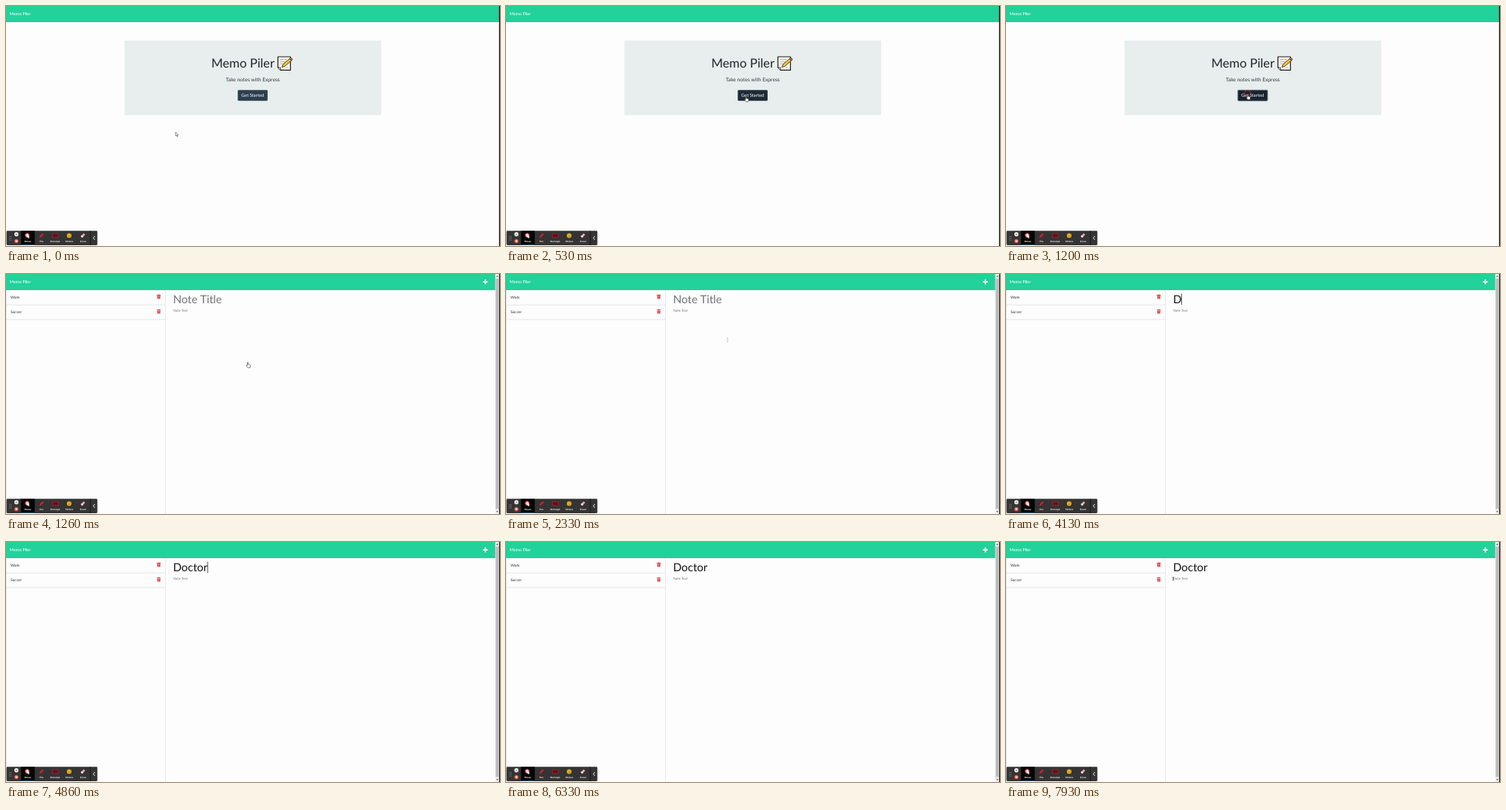
Write an HTML page that moves like this. It is 640 by 312 pixels and loops after 8 s.

```html
<!DOCTYPE html>
<html lang="en">
<head>
<meta charset="utf-8">
<title>Memo Piler</title>
<style>
  html, body { margin: 0; width: 100%; height: 100%; overflow: hidden; background: #fdfdfd; }
  svg { display: block; width: 100%; height: 100%; }
  text { font-family: Lato, sans-serif; text-rendering: geometricPrecision; white-space: pre; }
  .mid { text-anchor: middle; }
  .tool { font: bold 2.9px Lato, sans-serif; fill: #fff; text-anchor: middle; }
</style>
</head>
<body>
<svg viewBox="0 0 640 312">
  <defs>
    <g id="trash" fill="#e0474c">
      <path d="M0 .5h1.5l.4-.5h1.3l.4.5h1.5v.8H0z"/>
      <path d="M.3 1.6h4.5l-.3 3.6q0 .5-.5.5H1.1q-.5 0-.5-.5z"/>
      <path d="M1.7 2.4v2.5M2.55 2.4v2.5M3.4 2.4v2.5" stroke="#f6b9ba" stroke-width=".3"/>
    </g>
  </defs>

  <rect width="640" height="312" fill="#fdfdfd"/>
  <rect width="640" height="21" fill="#23d19a"/>
  <text x="4.8" y="12.4" font-size="5.4" font-weight="500" fill="#fff">Memo Piler</text>

  <g id="home">
    <rect x="153.5" y="44.8" width="332.5" height="97" fill="#e8eeed"/>
    <text x="266" y="80.2" font-size="16.2" fill="#212529">Memo Piler</text>
    <g stroke-linejoin="round">
      <path d="M352.3 66h16.2v17.4h-12.8l-3.4-3.4z" fill="#fbf8ee" stroke="#1d1d1d" stroke-width="1.2"/>
      <path d="M352.3 80h3.4v3.4" fill="#ddd" stroke="#1d1d1d" stroke-width=".8"/>
      <path d="M355 69.5h9M355 72.3h7M355 75h4.5M362 80h4" stroke="#a9a9a4" stroke-width=".8"/>
      <path d="M357.6 79.5l1.2-3.6 8.6-7.4 2.3 2.5-8.6 7.4z" fill="#f7c43c" stroke="#1d1d1d" stroke-width=".8"/>
      <path d="M367.4 68.5l1.5-1.2q1.7.4 2.2 2.5l-1.4 1.2z" fill="#e56b62" stroke="#1d1d1d" stroke-width=".7"/>
    </g>
    <text class="mid" x="319.7" y="98.2" font-size="6.7" fill="#333a40">Take notes with Express</text>
    <rect id="button" x="300.3" y="109.3" width="38.6" height="14" rx="1.3"/>
    <text class="mid" x="319.6" y="118.3" font-size="5.85" fill="#fff">Get Started</text>
    <path d="M639.4 0V312" stroke="#111" stroke-width="1.2"/>
  </g>

  <g id="notes">
    <path d="M617.9 10.2h6.4M621.1 7v6.4" stroke="#fff" stroke-width="1.6"/>
    <path d="M.4 21V312M206.6 21V312M0 40.2H206.5M0 59.2H206.5" stroke="#dfe1e2" stroke-width=".8"/>
    <g font-size="4.85" fill="#24282c">
      <text x="6" y="31.9">Work</text>
      <text x="6" y="51.1">Soccer</text>
    </g>
    <use href="#trash" x="195.4" y="26.6"/>
    <use href="#trash" x="195.4" y="45.8"/>
    <text id="title" x="216.4" y="38.2" font-size="14.5"></text>
    <text x="216.5" y="49.4" font-size="4.45" fill="#777">Note Text</text>
    <path id="caret" stroke="#111" stroke-width=".7"/>
    <rect x="633.8" width="5.2" height="312" fill="#f1f1f1"/>
    <rect x="634.4" y="6" width="3.8" height="299.5" fill="#bcbcbc"/>
    <path d="M635 3.7l1.4-1.7 1.4 1.7zM635 308.2l1.4 1.7 1.4-1.7z" fill="#505050"/>
    <path d="M639.4 0V312" stroke="#222" stroke-width="1.2"/>
  </g>

  <g id="toolbar">
    <rect x=".6" y="292.3" width="117.8" height="18.7" rx="1.4" fill="#343434"/>
    <path d="M4.7 299v6M6.5 299v6" stroke="#999" stroke-width=".8" stroke-dasharray=".8 .9"/>
    <circle cx="13.5" cy="296.8" r="2.7" fill="#f2f2f2"/>
    <path d="M12.6 295.9l1.8 1.8m0-1.8l-1.8 1.8" stroke="#333" stroke-width=".6"/>
    <circle cx="13.5" cy="305.6" r="2.7" fill="#ec5a50"/>
    <rect x="12.5" y="304.6" width="2" height="2" fill="#fff"/>
    <rect x="19.4" y="292.3" width="17.8" height="18.7" fill="#050505"/>
    <path d="M19.4 310.5h17.8" stroke="#2f6f96" stroke-width=".8"/>
    <circle cx="27.5" cy="298" r="2.6" fill="#f5c9c9" stroke="#cf2b36" stroke-width=".9"/>
    <path d="M27.7 297.2v4.4l1-.9.8 1.5.7-.4-.7-1.5h1.4z" fill="#fff"/>
    <path d="M43.2 301.3l.8-2.3 3.6-3.4 1.4 1.4-3.5 3.6z" fill="#dc1f2e"/>
    <rect x="60.2" y="296" width="7.6" height="5" fill="#4c1a1e" stroke="#b5172a" stroke-width=".9"/>
    <circle cx="81.8" cy="298.6" r="3" fill="#f3b51f"/>
    <path d="M80.2 299q1.6 2 3.2 0" fill="none" stroke="#5c3a05" stroke-width=".5"/>
    <path d="M80.7 297.3v.7M82.9 297.3v.7" stroke="#5c3a05" stroke-width=".6"/>
    <path d="M96.8 299.6l3.8-4 2 1.7-3.8 4z" fill="#f0a3ad"/>
    <path d="M96.8 299.6l1.4-1.5 2 1.7-1.4 1.5z" fill="#f7e4e6"/>
    <path d="M109.2 292.3V311" stroke="#111" stroke-width=".8"/>
    <path d="M115 299.2l-1.8 2.3 1.8 2.3" fill="none" stroke="#fff" stroke-width="1"/>
    <text class="tool" x="28.2" y="306.8">Mouse</text>
    <text class="tool" x="46" y="306.8">Pen</text>
    <text class="tool" x="63.8" y="306.8">Rectangle</text>
    <text class="tool" x="82" y="306.8">Stickers</text>
    <text class="tool" x="100" y="306.8">Eraser</text>
  </g>

  <circle id="ring" cx="313" cy="113.8" r="4.2" fill="none" stroke="#d8343f" stroke-width=".9"/>
  <g id="pointer" stroke-linejoin="round">
    <path id="arrow" d="M0 0v5l1.1-1 .8 1.8.8-.4-.8-1.7h1.5z" fill="#fff" stroke="#222" stroke-width=".5"/>
    <path id="hand" d="M-.6.6q.6-.9 1.2 0v2.5l2 .4q.9.3.8 1.3l-.5 2.6H-.1l-1.9-2.7q.1-.9 1.4 0z" fill="#fff" stroke="#222" stroke-width=".55"/>
    <path id="beam" d="M-.9 0h1.8M0 0v5M-.9 5h1.8" fill="none" stroke="#888" stroke-width=".4"/>
  </g>
</svg>
<script>
  const LOOP = 8000, OPEN = 1260;
  const STEP = 67; // pointer is sampled at this interval
  const $ = id => document.getElementById(id);
  const show = (id, on) => $(id).setAttribute('display', on ? 'inline' : 'none');
  const set = (id, attrs) => {
    for (const k in attrs) $(id).setAttribute(k, attrs[k]);
  };
  const within = (t, a, b) => t >= a && t < b;

  // Pointer stops: time, x, y
  const path = [
    [0, 219.8, 164], [600, 311, 117], [800, 311, 117], [860, 313.2, 114.4],
    [1460, 313.2, 114.4], [1660, 302, 102], [2060, 302, 102], [2860, 246, 31]
  ];
  const typed = [[4130, 'D'], [4330, 'Doc'], [4660, 'Doct'], [4800, 'Docto'], [4860, 'Doctor']];
  const titleCaret = [[3060, 3600], [4130, 5330]];
  const textCaret = [[5730, 6330], [6860, 7330], [7930, LOOP]];

  function pointerAt(t) {
    const i = path.findLastIndex(p => p[0] <= t);
    const a = path[i], b = path[i + 1];
    if (!b) return a.slice(1);
    const u = (t - a[0]) / (b[0] - a[0]);
    const k = u * u * (3 - 2 * u);
    return [a[1] + (b[1] - a[1]) * k, a[2] + (b[2] - a[2]) * k];
  }

  function drawPointer(t) {
    const s = t < 60 ? 0 : Math.min(60 + Math.floor((t - 60) / STEP + 1) * STEP, t + STEP);
    const [x, y] = pointerAt(t < OPEN ? s : t);
    const over = x > 300 && y < 123;
    set('pointer', { transform: `translate(${x} ${y})` });
    show('arrow', t < OPEN && !over);
    show('hand', t < 1460 && over);
    show('beam', within(t, 1460, 3060));
    show('ring', within(t, 1060, OPEN));
    const pressed = t >= 1060;
    set('button', {
      fill: pressed ? '#18232e' : over ? '#1e2b37' : '#2c3e50',
      stroke: pressed ? '#65727d' : 'none',
      'stroke-width': 0.8
    });
  }

  function drawNotes(t) {
    const last = typed.findLast(e => e[0] <= t);
    const title = $('title');
    title.textContent = last ? last[1] : 'Note Title';
    title.setAttribute('fill', last ? '#101214' : '#717476');
    const inTitle = titleCaret.some(r => within(t, ...r));
    const inText = textCaret.some(r => within(t, ...r));
    show('caret', inTitle || inText);
    const x = 216.5 + (inTitle && last ? title.getComputedTextLength() : 0);
    set('caret', { d: inText ? 'M216.5 45.2v5.2' : `M${x} 25.6v14.6` });
  }

  function draw(t) {
    show('home', t < OPEN);
    show('notes', t >= OPEN);
    drawPointer(t);
    drawNotes(t);
  }

  const start = performance.now();
  function tick() {
    draw((performance.now() - start) % LOOP);
    requestAnimationFrame(tick);
  }
  tick();
</script>
</body>
</html>
```
